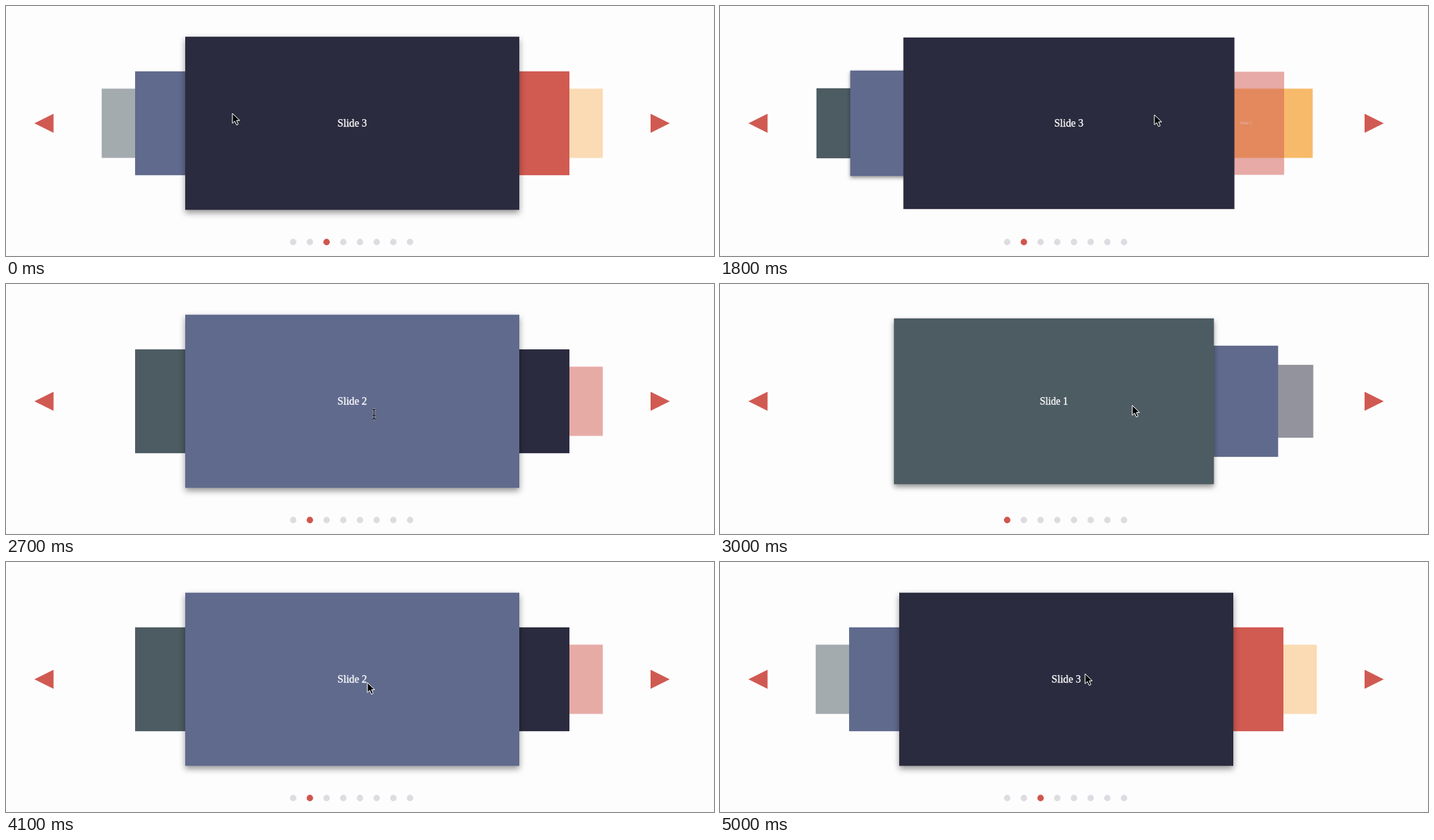
An HTML page that plays this animation: 960x340 px, repeating every 5.1 s.

```html
<!DOCTYPE html>
<html lang="en">
<head>
<meta charset="utf-8">
<title>Carousel</title>
<style>
  html, body { margin: 0; width: 100%; height: 100%; overflow: hidden; background: #fefdfe; }
  svg { display: block; width: 960px; height: 340px; }
  text { font: 14.25px "Liberation Serif", "Times New Roman", serif; fill: #fff; stroke: #fff; stroke-width: .3px; text-anchor: middle; }
</style>
</head>
<body>
<svg id="stage" viewBox="0 0 960 340" xmlns="http://www.w3.org/2000/svg">
  <defs>
    <filter id="shadow" x="-10%" y="-15%" width="120%" height="130%" color-interpolation-filters="sRGB">
      <feDropShadow dx="0" dy="4" stdDeviation="4" flood-color="#000" flood-opacity=".42"/>
    </filter>
  </defs>
  <rect width="960" height="340" fill="#fefdfe"/>
  <rect y="338" width="960" height="2" fill="#fbfafb"/>
  <path d="M38.5 159.5L64.5 146.5V172.5ZM900 159.5L874 146.5V172.5Z" fill="#d05a52"/>
  <g id="dots"></g>
  <g id="slides"></g>
  <path id="arrow" d="M0 0V13.5L3.2 10.6L5.5 15.8L7.9 14.8L5.7 9.7H10Z" fill="#000" stroke="#fff" stroke-width="1"/>
  <g id="beam" fill="none">
    <path d="M-3 -7Q0 -7 0 -5Q0 -7 3 -7M0 -5V5M-3 7Q0 7 0 5Q0 7 3 7M-2 1.5H2" stroke="#fff" stroke-opacity=".45" stroke-width="2.6"/>
    <path d="M-3 -7Q0 -7 0 -5Q0 -7 3 -7M0 -5V5M-3 7Q0 7 0 5Q0 7 3 7M-2 1.5H2" stroke="#16161c" stroke-width="1.2"/>
  </g>
</svg>
<script>
const LOOP = 5100, STEP = 100, MOVE = 300;
const W = 453, H = 235.5, CX = 469.5, CY = 159.5;
const COLORS = ["#4d5c62", "#606a8d", "#2b2b3f", "#d15a51", "#f7ba6a"];

// start time, slide left, slide entered
const TURNS = [[1768, 2, 1], [2768, 1, 0], [3768, 0, 1], [4668, 1, 2]];

// time, x, y of the pointer
const POINTER = [
  [0, 307, 146], [100, 430, 147], [200, 591, 146], [800, 591, 146],
  [1300, 388, 147], [1400, 390, 147], [1800, 589, 148], [2000, 588, 148],
  [2500, 455, 180], [2700, 499, 177], [2800, 559, 165], [3200, 559, 165],
  [3500, 616, 174], [3600, 616, 174], [3700, 565, 167], [3800, 490, 164],
  [4100, 490, 164], [4200, 545, 150], [4300, 557, 152], [4400, 557, 152],
  [4700, 495, 152], [5100, 495, 152]
];
const DRAGS = [[1500, 1768], [2600, 2768], [3700, 3768], [4500, 4668]];

const byId = id => document.getElementById(id);
const lerp = (a, b, p) => a + (b - a) * p;

function add(parent, tag, attrs) {
  const node = document.createElementNS("http://www.w3.org/2000/svg", tag);
  for (const key in attrs) node.setAttribute(key, attrs[key]);
  return parent.appendChild(node);
}

// cubic-bezier(.42, 0, .58, 1)
function easeInOut(x) {
  if (x <= 0) return 0;
  if (x >= 1) return 1;
  let lo = 0, hi = 1, u = .5;
  for (let i = 0; i < 24; i++) {
    u = (lo + hi) / 2;
    const v = 1 - u;
    if (1.26 * v * v * u + 1.74 * v * u * u + u * u * u < x) lo = u; else hi = u;
  }
  return u * u * (3 - 2 * u);
}

function slot(offset) {
  const side = Math.sign(offset);
  switch (Math.abs(offset)) {
    case 0: return { x: 0, scale: 1, z: 3, opacity: 1 };
    case 1: return { x: side * W * .35, scale: .6, z: 2, opacity: 1 };
    case 2: return { x: side * W * .55, scale: .4, z: 1, opacity: .5 };
    default: return { x: 0, scale: .4, z: 0, opacity: 1 };
  }
}

const dots = Array.from({ length: 8 }, (_, i) =>
  add(byId("dots"), "circle", { cx: 389.4 + 22.64 * i, cy: 321, r: 4.4 }));

const slides = COLORS.map((fill, index) => {
  const group = add(byId("slides"), "g", {});
  const card = add(group, "rect", { x: -W / 2, y: -H / 2, width: W, height: H, fill });
  add(group, "text", { y: 4.5 }).textContent = "Slide " + (index + 1);
  return { group, card, index, z: 0 };
});

function drawSlides(t) {
  const turn = TURNS.filter(([start]) => start <= t).pop();
  const [start, from, to] = turn || [-MOVE, 2, 2];
  const p = easeInOut((t - start) / MOVE);
  for (const s of slides) {
    const a = slot(s.index - from), b = slot(s.index - to);
    s.z = Math.round(lerp(a.z, b.z, p));
    const x = CX + lerp(a.x, b.x, p), scale = lerp(a.scale, b.scale, p);
    s.group.setAttribute("transform", `translate(${x} ${CY}) scale(${scale})`);
    s.group.setAttribute("opacity", b.opacity);
    s.card.setAttribute("filter", s.index === to ? "url(#shadow)" : "none");
  }
  [...slides].sort((a, b) => a.z - b.z || a.index - b.index)
    .forEach(s => byId("slides").appendChild(s.group));
  dots.forEach((dot, i) => dot.setAttribute("fill", i === to ? "#d0564d" : "#dddce1"));
}

function drawPointer(t) {
  const next = POINTER.findIndex(key => key[0] > t);
  const [t0, x0, y0] = POINTER[next - 1], [t1, x1, y1] = POINTER[next];
  const p = (t - t0) / (t1 - t0);
  const place = `translate(${lerp(x0, x1, p)} ${lerp(y0, y1, p)})`;
  const dragging = DRAGS.some(([a, b]) => t >= a && t < b);
  for (const [id, shown] of [["arrow", !dragging], ["beam", dragging]]) {
    byId(id).setAttribute("transform", place);
    byId(id).setAttribute("visibility", shown ? "visible" : "hidden");
  }
}

function draw(t) {
  drawSlides(t);
  drawPointer(t);
}

const begin = performance.now();
function tick() {
  const t = Math.max(0, performance.now() - begin) % LOOP;
  draw(Math.floor(t / STEP) * STEP);
  requestAnimationFrame(tick);
}
tick();
</script>
</body>
</html>
```
